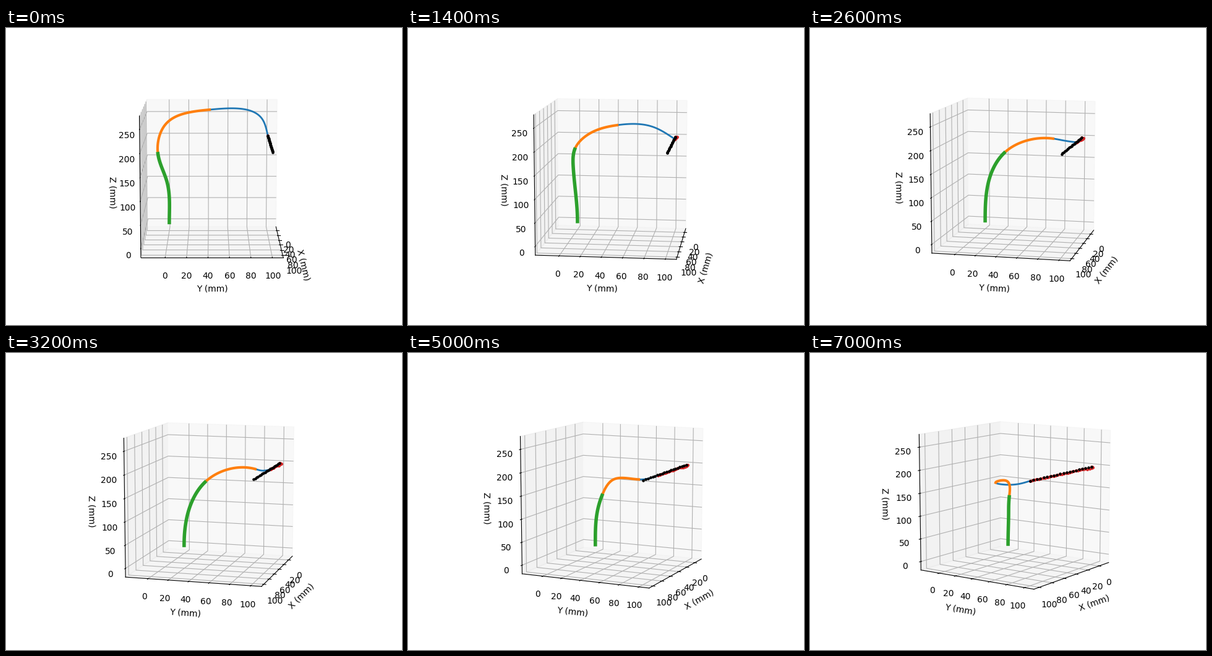
A matplotlib script for the animation above (7.2 s loop, 640 by 480 pixels).

```python
import numpy as np
import matplotlib.pyplot as plt
from matplotlib.animation import FuncAnimation
from matplotlib.lines import Line2D
from mpl_toolkits.mplot3d import proj3d

W, H = 640, 480
FRAMES, STEP_MS = 36, 200
SETTLE = 5  # frames before the tip starts along the path

# Key poses by time step, in stage pixels:
# outer mid, outer end, middle mid, middle end, inner mid
POSES = {
    0: [(260, 248), (245.5, 203), (256, 158), (329, 132), (415, 148.5)],
    7: [(267, 224), (269.5, 196), (292, 171.5), (338, 157), (395, 159.5)],
    11: [(287, 226), (302.5, 198.5), (333, 179), (378, 172), (406, 175)],
    25: [(305, 262), (313.7, 230), (331, 205), (373, 204.3), (387, 203.3)],
    35: [(321, 260), (322, 232.5), (315.5, 206), (300, 209.5), (312, 212.5)],
}


def spline(t, p, q, start=None):
    """Cubic spline through p at t, sampled at q; natural or clamped start."""
    t, p = np.asarray(t, float), np.asarray(p, float)
    n, h = len(t), np.diff(t)
    slope = np.diff(p, axis=0) / h[:, None]
    a, rhs = np.eye(n), np.zeros_like(p)
    for i in range(1, n - 1):
        a[i, i - 1:i + 2] = h[i - 1], 2 * (h[i - 1] + h[i]), h[i]
        rhs[i] = 6 * (slope[i] - slope[i - 1])
    if start is not None:
        a[0, :2] = 2 * h[0], h[0]
        rhs[0] = 6 * (slope[0] - start)
    m = np.linalg.solve(a, rhs)
    i = np.clip(np.searchsorted(t, q, side="right") - 1, 0, n - 2)
    hi = h[i][:, None]
    u = (t[i + 1] - q)[:, None] / hi
    v = 1 - u
    bend = (u**3 - u) * m[i] + (v**3 - v) * m[i + 1]
    return u * p[i] + v * p[i + 1] + bend * hi**2 / 6


def bump(t, center):
    return np.exp(-((t - center) / 2)**2)


steps = np.arange(FRAMES)
keys = np.reshape(list(POSES.values()), (len(POSES), -1))
poses = spline(list(POSES), keys, steps).reshape(FRAMES, -1, 2)

# The tip strays a little at first, then follows the path just below it
last = FRAMES - 1
tips = np.column_stack([
    100 * np.clip((steps - SETTLE) / (last - SETTLE), 0, 1),
    100 + 1.6 * bump(steps, 3),
    200 - 3 * bump(steps, 6) - 1.3 * np.sin(np.pi * steps / last),
])

fig = plt.figure(figsize=(W / 100, H / 100), dpi=100)
side = 0.77 * H
ax = fig.add_axes([0.5125 - side / W / 2, 0.11, side / W, 0.77],
                  projection="3d")
ax.set_box_aspect((1, 1, 1))

# Inner tube first, so that wider tubes cover it
tubes = []
for color, width, start in (("tab:blue", 2, 4), ("tab:orange", 3, 2),
                            ("tab:green", 4, 0)):
    line = Line2D([], [], color=color, lw=width, transform=fig.transFigure,
                  solid_capstyle="projecting")
    ax.add_artist(line)
    tubes.append((line, start))

dots = dict(ls="", marker="o", mew=0)
trail, = ax.plot([], [], [], color="tab:red", ms=3.6, **dots)
path = np.linspace(0, 100, 20)
ax.plot(path, np.full(20, 100), np.full(20, 200), color="black", ms=3.3,
        **dots)

ax.set(xlim=(-17.4, 108.1), ylim=(-22.7, 110.2), zlim=(-18.9, 277.6),
       xticks=range(0, 101, 20), yticks=range(0, 101, 20),
       zticks=range(0, 251, 50),
       xlabel="X (mm)", ylabel="Y (mm)", zlabel="Z (mm)")


def to_stage(point):
    """Project a point in mm to stage pixels, y down."""
    x, y, _ = proj3d.proj_transform(*point, ax.get_proj())
    pixel = ax.transData.transform((float(x), float(y)))
    fx, fy = fig.transFigure.inverted().transform(pixel)
    return fx * W, (1 - fy) * H


def update(frame):
    ax.view_init(elev=10, azim=frame)
    pts = np.vstack([to_stage((0, 0, 0)), poses[frame],
                     to_stage(tips[frame])])
    arc = np.append(0, np.cumsum(np.hypot(*np.diff(pts, axis=0).T)))
    for line, start in tubes:
        along = np.linspace(arc[start], arc[start + 2], 40)
        x, y = spline(arc, pts, along, start=np.array([0, -1])).T
        line.set_data(x / W, 1 - y / H)
    trail.set_data_3d(*tips[:frame + 1].T)
    return [trail] + [line for line, _ in tubes]


anim = FuncAnimation(fig, update, frames=FRAMES, interval=STEP_MS,
                     repeat=True, blit=False)
plt.show()
```
